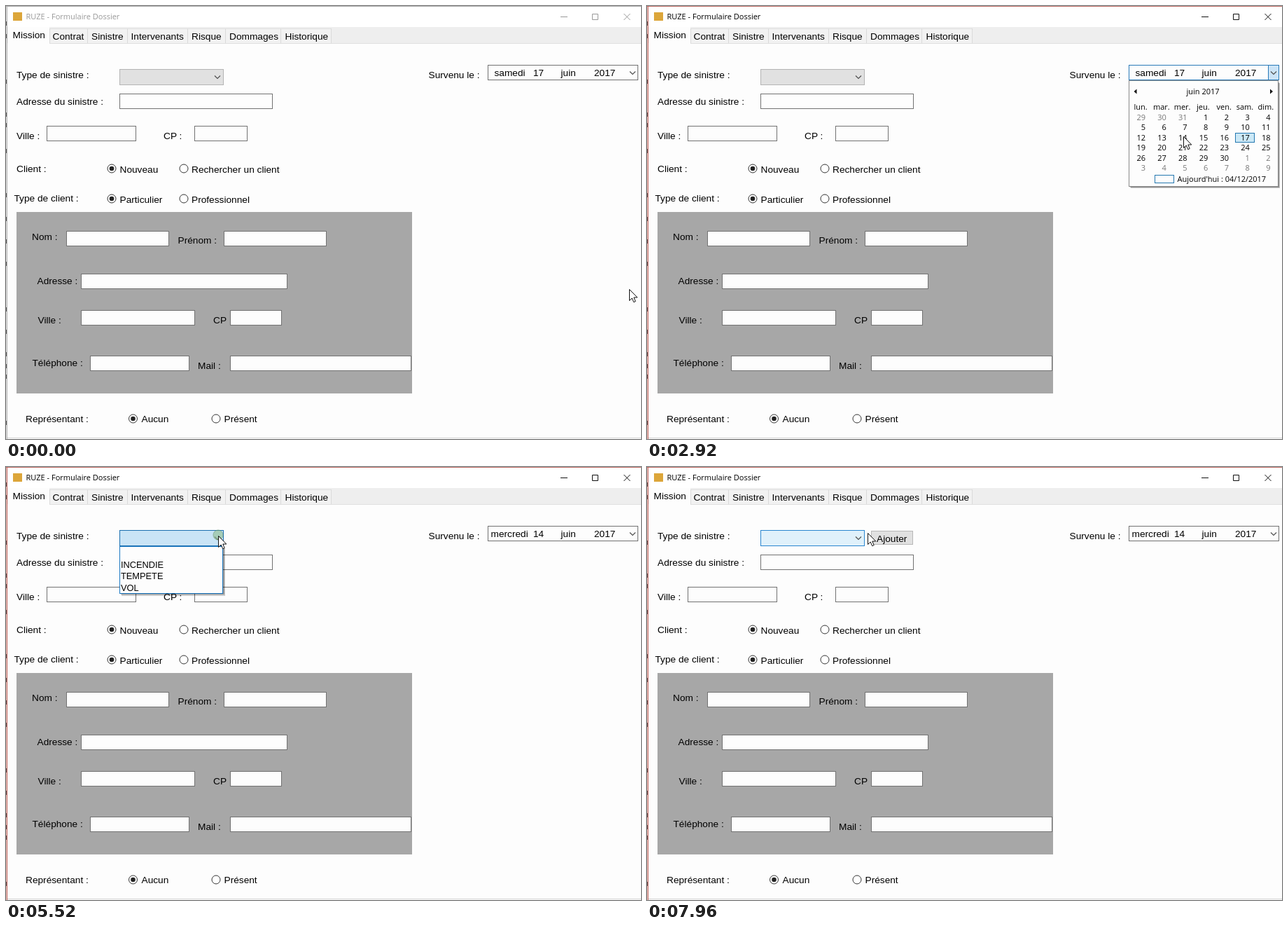
Recreate the animation shown at these times as an HTML page. Size 907x618 px, loop 8000 ms.

```html
<!DOCTYPE html>
<html lang="fr">
<head>
<meta charset="utf-8">
<title>Formulaire Dossier</title>
<style>
  html, body { margin: 0; width: 100%; height: 100%; overflow: hidden; background: #fdfdfd; }
  svg { display: block; width: 907px; height: 618px; }
  text { font: 13.7px "Liberation Sans", Arial, sans-serif; fill: #000; white-space: pre; }
  .ui { font: 11px "Open Sans", "Noto Sans", sans-serif; }
  .item { font-size: 12.8px; }
</style>
</head>
<body>
<svg id="stage" viewBox="0 0 907 618"></svg>
<script>
const NS = 'http://www.w3.org/2000/svg';
const stage = document.getElementById('stage');
const LOOP = 8000;

function set(node, attrs) {
  for (const k in attrs) node.setAttribute(k, attrs[k]);
  return node;
}
function add(parent, tag, attrs) {
  return parent.appendChild(set(document.createElementNS(NS, tag), attrs));
}
const group = (parent = stage) => add(parent, 'g', {});
const fillRect = (p, x, y, width, height, fill) => add(p, 'rect', { x, y, width, height, fill });
const box = (p, x, y, w, h, stroke = '#727272', fill = '#fdfdfd') =>
  add(p, 'rect', { x: x + .5, y: y + .5, width: w - 1, height: h - 1, fill, stroke });
const line = (p, d, stroke, width = 1) =>
  add(p, 'path', { d, stroke, fill: 'none', 'stroke-width': width });
function label(p, x, y, str, attrs = {}) {
  const t = add(p, 'text', { x, y, ...attrs });
  t.textContent = str;
  return t;
}
const chevron = (p, x, y) => line(p, `M${x - 4} ${y - 2}l4 4l4 -4`, '#505050', 1.2);
const show = (node, on) => set(node, { visibility: on ? 'visible' : 'hidden' });

function radio(x, y, str, on, tx, base) {
  add(stage, 'circle', { cx: x, cy: y, r: 6, fill: '#fff', stroke: '#333' });
  if (on) add(stage, 'circle', { cx: x, cy: y, r: 3.3, fill: '#222' });
  label(stage, tx, base, str);
}

// Window frame
fillRect(stage, 0, 0, 907, 618, '#fdfdfd');
fillRect(stage, 2, 0, 905, 30, '#fff');
const strip = fillRect(stage, 0, 0, 1, 618);
const topEdge = fillRect(stage, 0, 0, 907, 1);
const leftEdge = fillRect(stage, 1, 0, 1, 618);
for (const y of [22, 40, 105, 152, 167, 204, 267, 301, 333, 365, 430, 462, 494, 511, 526, 592])
  fillRect(stage, 0, y, 1, 6, '#555');
fillRect(stage, 2, 616, 905, 1, '#d4d4d4');
fillRect(stage, 10, 9, 13, 12, '#dca63a');
const title = label(stage, 28.5, 19, 'RUZE - Formulaire Dossier', { class: 'ui' });
const buttons = line(stage, 'M792 15.5h10M837.5 11.5h8v8h-8zM882.5 11l9 9M891.5 11l-9 9', '#000');

// Tabs
fillRect(stage, 2, 30, 905, 23, '#eeeeee');
fillRect(stage, 62, 32, 402, 21, '#f2f2f2');
fillRect(stage, 3, 30, 59, 24, '#fdfdfd');
line(stage, 'M62 32.5H464M62 53.5H907', '#e0e0e0');
for (const x of [62, 116, 173, 259, 313, 392, 464]) line(stage, `M${x}.5 32v21`, '#dadada');
[[9.5, 'Mission'], [66.5, 'Contrat'], [122, 'Sinistre'], [178.5, 'Intervenants'], [265, 'Risque'],
 [319, 'Dommages'], [398.5, 'Historique']].forEach(([x, s], i) => label(stage, x, i ? 48 : 46, s));

// Form
fillRect(stage, 15, 294, 565, 259, '#a7a7a7');
[[15, 103, 'Type de sinistre :'], [15, 141, 'Adresse du sinistre :'], [15, 190, 'Ville :'],
 [225, 190, 'CP :'], [15, 237, 'Client :'], [11.5, 279, 'Type de client :'], [37, 334, 'Nom :'],
 [245.5, 339, 'Prénom :'], [44.5, 397, 'Adresse :'], [45.5, 453, 'Ville :'], [296, 453, 'CP'],
 [37.5, 514, 'Téléphone :'], [274, 518, 'Mail :'], [28, 594, 'Représentant :'],
 [603.5, 103, 'Survenu le :']].forEach(a => label(stage, ...a));
[[162, 125, 219, 22], [58, 171, 128, 22], [269, 171, 76, 22], [86, 321, 147, 22], [311, 321, 147, 22],
 [107, 382, 295, 22], [107, 434, 163, 22], [320, 434, 74, 22], [120, 499, 142, 22],
 [320, 499, 259, 22]].forEach(a => box(stage, ...a));
radio(151, 232, 'Nouveau', true, 162.5, 238);
radio(254, 232, 'Rechercher un client', false, 265, 238);
radio(151, 275, 'Particulier', true, 162.5, 281);
radio(254, 275, 'Professionnel', false, 265, 281);
radio(181.5, 589, 'Aucun', true, 193.5, 594);
radio(300, 589, 'Présent', false, 311.5, 594);

// Date field
const dateBox = box(stage, 688, 84, 215, 22);
const dropBtn = box(stage, 887, 84, 16, 22, '#2a7ab8', '#cce4f7');
chevron(stage, 895, 95.5);
const daySel = fillRect(stage, 752, 87, 16, 17, '#3399ff');
const weekday = label(stage, 698, 100, '');
const day = label(stage, 753, 100, '');
label(stage, 792.5, 100, 'juin');
label(stage, 840, 100, '2017');

// Calendar
const cal = group();
fillRect(cal, 691, 110, 213, 150, 'rgba(0,0,0,.22)');
fillRect(cal, 690, 109, 213, 150, 'rgba(0,0,0,.28)');
box(cal, 688, 106, 214, 152, '#8a8a8a');
add(cal, 'path', { d: 'M699.5 118.5v7l-4 -3.5zM890 118.5v7l4 -3.5z', fill: '#111' });
const calText = (x, y, s, anchor, fill = '#000') =>
  label(cal, x, y, s, { class: 'ui', 'text-anchor': anchor, style: `fill:${fill}` });
calText(794, 126, 'juin 2017', 'middle');
box(cal, 840, 181, 28, 14, '#2478b0', '#cbe8f6');
['lun.', 'mar.', 'mer.', 'jeu.', 'ven.', 'sam.', 'dim.'].forEach((s, i) =>
  calText(705 + i * 29.8, 148, s, 'middle'));
for (let i = 0; i < 42; i++) {
  const n = i - 2;
  const inside = n > 0 && n <= 30;
  calText(712 + i % 7 * 29.75, 163 + Math.floor(i / 7) * 14.4,
    inside ? n : n <= 0 ? n + 31 : n - 30, 'end', inside ? '#000' : '#777');
}
box(cal, 725, 241, 28, 12, '#2478b0');
calText(757.5, 251, "Aujourd'hui : 04/12/2017", 'start');

// Combo box, its list and the button
const addBtn = group();
box(addBtn, 320, 91, 60, 20, '#b8b8b8', '#e1e1e1');
label(addBtn, 328, 107, 'Ajouter');
const combo = box(stage, 162, 90, 149, 23);
chevron(stage, 302, 101.5);
const list = group();
fillRect(list, 165, 116, 148, 68, 'rgba(0,0,0,.2)');
fillRect(list, 164, 115, 148, 67, 'rgba(0,0,0,.25)');
box(list, 162, 113, 148, 68, '#1a78c2');
const hover = fillRect(list, 163, 114, 146, 16.5, '#3399ff');
const items = ['', 'INCENDIE', 'TEMPETE', 'VOL'].map((s, i) =>
  label(list, 164, 127.5 + i * 16.4, s, { class: 'item' }));

// Pointer
const ring = add(stage, 'circle', { r: 7, fill: '#8fbf8f', stroke: '#5f8f5f' });
const pointer = add(stage, 'path', {
  d: 'M.5 .5V16.5L4.2 13L6.7 18.7L9.2 17.6L6.8 12H11.8Z', fill: '#fff', stroke: '#111'
});

const OPEN_CAL = 1320, PICK_DAY = 3480, OPEN_LIST = 5400, PICK_ITEM = 7280;
const CLICKS = [OPEN_CAL, PICK_DAY, OPEN_LIST, PICK_ITEM];
const PATH = [ // time, x, y
  [0, 890, 404], [120, 890, 404], [880, 894, 118], [960, 894, 116], [1200, 894, 97], [1500, 894, 97],
  [1960, 881, 142], [2900, 766, 186], [3600, 764, 186], [4120, 748, 176], [4300, 748, 176],
  [5240, 303, 98], [5840, 303, 98], [6120, 286, 174], [6320, 281, 140], [6480, 281, 140],
  [6640, 278, 129], [7400, 276, 124], [7920, 315, 94], [LOOP, 315, 94]
];

function pointerAt(t) {
  const i = Math.max(1, PATH.findIndex(p => p[0] >= t));
  const [t0, x0, y0] = PATH[i - 1], [t1, x1, y1] = PATH[i];
  const u = (t - t0) / (t1 - t0), e = u * u * (3 - 2 * u);
  return [x0 + (x1 - x0) * e, y0 + (y1 - y0) * e].map(Math.round);
}

function draw(t) {
  const [x, y] = pointerAt(t);
  const active = t >= OPEN_CAL;
  const calOpen = active && t < PICK_DAY;
  const picked = t >= PICK_DAY;
  const dateFocus = active && t < OPEN_LIST;
  const listOpen = t >= OPEN_LIST && t < PICK_ITEM;
  const done = t >= PICK_ITEM;

  set(strip, { fill: active ? '#e6cfca' : '#e0e0e0' });
  set(topEdge, { fill: active ? '#bd6a64' : '#a8a8a8' });
  set(leftEdge, { fill: active ? '#c0605a' : '#b4b4b4' });
  title.style.fill = active ? '#000' : '#999';
  set(buttons, { stroke: active ? '#111' : '#999' });

  set(dateBox, { stroke: dateFocus ? '#2a7ab8' : '#727272' });
  show(dropBtn, calOpen);
  show(cal, calOpen);
  show(daySel, picked && dateFocus);
  weekday.textContent = picked ? 'mercredi' : 'samedi';
  set(weekday, { x: picked ? 692.5 : 697.5 });
  day.textContent = picked ? '14' : '17';
  day.style.fill = picked && dateFocus ? '#fff' : '#000';

  const over = x >= 162 && x < 311 && y >= 90 && y < 113;
  const lit = over || done;
  set(combo, {
    fill: listOpen ? '#c9e4f6' : lit ? '#e0f1fb' : '#e1e1e1',
    stroke: listOpen ? '#1a6fb0' : lit ? '#2a86d0' : '#b4b4b4'
  });
  show(list, listOpen);
  const row = y >= 113 ? Math.min(3, Math.floor((y - 113) / 16.5)) : -1;
  show(hover, listOpen && row >= 0);
  set(hover, { y: 114 + row * 16.5 });
  items.forEach((item, i) => item.style.fill = i === row ? '#fff' : '#000');
  show(addBtn, done);

  const since = Math.min(...CLICKS.map(c => t >= c ? t - c : Infinity));
  show(ring, since < 320);
  set(ring, { cx: x, cy: y - 1, opacity: since < 320 ? .8 * (1 - since / 480) : 0 });
  set(pointer, { transform: `translate(${x} ${y})` });
}

const start = performance.now();
function tick() {
  draw((performance.now() - start) % LOOP);
  requestAnimationFrame(tick);
}
tick();
</script>
</body>
</html>
```
